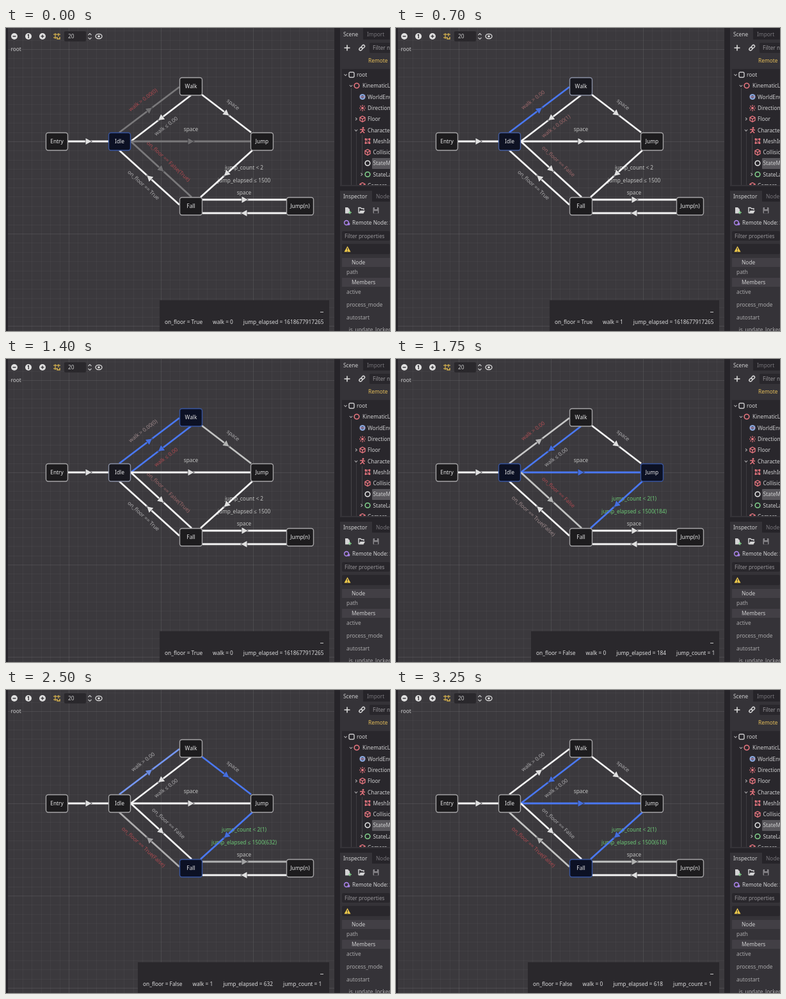
Write an HTML page with a canvas that moves like this. It is 600 px wide and 473 px high and loops after 3.3 s.

```html
<!DOCTYPE html>
<html lang="en">
<head>
<meta charset="utf-8">
<title>State machine editor</title>
<style>
html, body { margin: 0; width: 100%; height: 100%; overflow: hidden; background: #262429; }
canvas { display: block; }
</style>
</head>
<body>
<canvas id="c" width="600" height="473"></canvas>
<script>
const ctx = document.getElementById('c').getContext('2d');
const LOOP = 3300, STEP = 50, RATE = 3.9756;
const FONT = '8.35px "Noto Sans", "Open Sans", sans-serif';

const COLORS = {
  w: [244, 244, 244], g: [122, 121, 123], d: [94, 93, 96], m: [194, 195, 194],
  b: [74, 120, 242], l: [150, 180, 246],
  e: [172, 171, 173], r: [173, 73, 79], p: [158, 104, 106], k: [158, 138, 140], v: [108, 200, 118]
};
const LEVELS = { n: [0], h: [0.25], a: [1] };

// "g0 g600 w700": key letter plus time in ms, linear in between
function track(text, table = COLORS) {
  const keys = text.split(' ').map(s => ({ v: table[s[0]], t: +s.slice(1) }));
  return t => {
    let i = keys.length - 1;
    while (i > 0 && keys[i].t > t) i--;
    const a = keys[i], b = keys[i + 1];
    if (!b) return a.v;
    const f = Math.max(0, (t - a.t) / (b.t - a.t));
    return a.v.map((x, n) => x + (b.v[n] - x) * f);
  };
}
const rgb = c => `rgb(${c.map(Math.round)})`;

const states = 'I0 W650 I1350 J1700 F1750 I2250 W2300 J2350 F2400 I2900 W2950 I3000 J3100 F3150'
  .split(' ').map(s => [s[0], +s.slice(1)]);
const jumps = [[1700, 1703.72], [2350, 2341.15], [3100, 3094.55]];

function sample(t) {
  const state = states.filter(s => s[1] <= t).pop()[0];
  const jump = jumps.filter(j => j[0] <= t).pop();
  return {
    state,
    air: state === 'J' || state === 'F',
    jumped: !!jump,
    walk: +((t >= 650 && t < 1350) || (t >= 2250 && t < 3000)),
    elapsed: jump ? Math.max(0, Math.round((t - jump[1]) * RATE)) : 1618677917265
  };
}

const nodes = [
  ['Entry', 62, 163, 35, 'n0'],
  ['Idle', 160, 163, 35, 'a0 a680 n850 n1360 h1400 a1470 a1750 n1900 n2240 a2270 a2300 n2400 n2880 a2910 n2960 a3010 a3100 n3230'],
  ['Walk', 271, 77, 36, 'n0 n650 h700 a800 a1400 n1550 n2290 a2320 n2440 n2930 a2970 a3000 n3100'],
  ['Jump', 382, 163, 36, 'n0 n1690 a1710 a1750 n1900 n2330 a2360 n2500 n3090 a3120 a3150 n3240'],
  ['Fall', 271, 264, 36, 'n0 n1760 a1900 a2240 n2350 n2400 a2500 a2870 n3000 n3150 a3240'],
  ['Jump(n)', 438, 264, 43, 'n0']
].map(([name, x, y, w, keys]) => ({ name, x, y, w, level: track(keys, LEVELS) }));

const edges = [
  [97, 177, 160, 177, 'w0'],
  [177, 163, 271, 92, 'g0 g600 b650 b1430 g1600 g1690 m1740 w1850 w2290 b2300 b2400 w2800 w2940 b2950 b3010 w3200'],
  [289, 105, 195, 177, 'w0 w1340 b1350 b1800 w2150 w2990 b3000'],
  [306, 104, 383, 163, 'w0 w700 g850 g1340 m1400 w1500 w2340 b2350 b2500 w2800'],
  [195, 177, 382, 177, 'g0 g600 w700 w1420 g1550 g1690 b1700 b2000 l2200 w2350 w3090 b3100'],
  [195, 177, 290, 264, 'g0 g600 w700 w1400 g1550 g1690 m1750 w1850'],
  [385, 191, 304, 264, 'w0 w1740 b1750 b2050 l2200 w2350 w2390 b2400 b2550 w2800 w3140 b3150'],
  [271, 276, 177, 191, 'w0 w1760 g1900 g2240 b2250 b2350 w2430 g2550 g2800 m2850 b2900 b2950 w3100 w3180 m3250'],
  [307, 268, 438, 268, 'w0 w1760 g1900 g2220 w2300 w2420 d2600 d2860 w2950 w3190 m3250'],
  [438, 289, 307, 289, 'w0']
].map(([x1, y1, x2, y2, keys]) => ({ x1, y1, x2, y2, color: track(keys) }));

const labels = [
  [214, 112, -37, s => 'walk > 0.00' + (s.state === 'I' && !s.walk ? '(0)' : ''),
    'r0 r600 p700 e850 e1350 k1400 r1550 r1690 r1740 e1950'],
  [250, 153, -37, s => 'walk ≤ 0.00' + (s.state === 'W' ? '(1)' : ''),
    'e0 e650 p700 r800 r1400 e1600'],
  [254, 208, 42.5, s => 'on_floor == False' + (s.state === 'I' ? '(True)' : ''),
    'r0 r600 p700 e850 e1350 p1400 r1550 r1750 e1950'],
  [215, 245, 42.5, s => 'on_floor == True' + (s.air ? '(False)' : ''),
    'e0 e1700 k1750 r1900 r2240 e2300 e2350 r2480 r2890 e2950 e3100 r3250'],
  [355, 119, 38, () => 'space', 'e0'],
  [289, 158, 0, () => 'space', 'm0'],
  [372, 257, 0, () => 'space', 'm0'],
  [372, 218, 0, s => 'jump_count < 2' + (s.air ? '(1)' : ''),
    'm0 m1690 v1700 v2240 m2300 m2340 v2350 v2890 m2950 m3090 v3100'],
  [372, 238, 0, s => 'jump_elapsed ≤ 1500' + (s.air ? `(${s.elapsed})` : ''),
    'm0 m1690 v1700 v2060 r2150 r2240 m2300 m2340 v2350 v2700 r2800 r2890 m2950 m3090 v3100']
].map(([x, y, deg, text, keys]) => ({ x, y, deg, text, color: track(keys) }));

function box(x, y, w, h, fill, r = 0, stroke) {
  ctx.beginPath();
  ctx.roundRect(x, y, w, h, r);
  if (fill) { ctx.fillStyle = fill; ctx.fill(); }
  if (stroke) { ctx.strokeStyle = stroke; ctx.stroke(); }
}
function text(str, x, y, color = '#d0d0d1', align = 'left') {
  ctx.font = FONT;
  ctx.textAlign = align;
  ctx.fillStyle = color;
  ctx.fillText(str, x, y + 3);
}
function path(points, color, width = 1, close = false, fill = false) {
  ctx.beginPath();
  for (let i = 0; i < points.length; i += 2) ctx.lineTo(points[i], points[i + 1]);
  if (close) ctx.closePath();
  ctx.lineWidth = width;
  ctx.strokeStyle = ctx.fillStyle = color;
  if (fill) ctx.fill(); else ctx.stroke();
}
function disc(x, y, r, color, width = 0) {
  ctx.beginPath();
  ctx.arc(x, y, r, 0, 7);
  ctx.lineWidth = width;
  ctx.strokeStyle = ctx.fillStyle = color;
  if (width) ctx.stroke(); else ctx.fill();
}

function drawGrid() {
  box(3, 0, 510, 473, '#3b393d');
  const line = (i, x, y, w, h) => {
    ctx.fillStyle = i % 10 ? 'rgba(255,255,255,.035)' : 'rgba(255,255,255,.085)';
    ctx.fillRect(x, y, w, h);
  };
  for (let i = -6; i < 29; i++) line(i, Math.round(98 + i * 14.4), 0, 1, 473);
  for (let i = -2; i < 31; i++) line(i, 3, Math.round(33 + i * 14.4), 510, 1);
}

function drawToolbar() {
  const light = '#e0e0e0', dark = '#39373b';
  for (const x of [13, 35, 57]) disc(x, 13, 5, light);
  path([10.5, 13, 15.5, 13], dark, 1.5);
  path([33.7, 11.2, 35.3, 10.4, 35.3, 16], dark, 1.4);
  path([54.5, 13, 59.5, 13], dark, 1.4);
  path([57, 10.5, 57, 15.5], dark, 1.4);
  const gold = '#d9b44f';
  path([77, 8, 77, 17], gold, 1.2);
  path([82, 8, 82, 13], gold, 1.2);
  path([74, 10, 85, 10], gold, 1.2);
  path([74, 15, 79, 15], gold, 1.2);
  path([80, 14, 80, 17, 84, 17, 84, 14], gold, 1.5);
  box(91, 5, 34, 16, '#2a282c', 2);
  text('20', 97, 13);
  path([128.5, 11, 131, 8.5, 133.5, 11], '#c5c5c6', 1.2);
  path([128.5, 15, 131, 17.5, 133.5, 15], '#c5c5c6', 1.2);
  ctx.beginPath();
  ctx.ellipse(145, 13, 5, 3.7, 0, 0, 7);
  ctx.lineWidth = 1.3;
  ctx.strokeStyle = light;
  ctx.stroke();
  disc(145, 13, 1.8, light);
  text('root', 7.5, 33, '#c4c4c5');
}

function drawEdge(e, t) {
  const c = e.color(t), angle = Math.atan2(e.y2 - e.y1, e.x2 - e.x1);
  path([e.x1, e.y1, e.x2, e.y2], rgb(c), 2.8);
  ctx.save();
  ctx.translate((e.x1 + e.x2) / 2, (e.y1 + e.y2) / 2);
  ctx.rotate(angle);
  const tri = [-4, -5, 5, 0, -4, 5];
  path(tri, 'rgba(50,48,53,.75)', 1.6, true);
  path(tri, rgb(c.map(x => x * 0.92)), 1, true, true);
  ctx.restore();
}

function drawNode(n, t) {
  const k = n.level(t)[0], mix = (a, b) => rgb(a.map((x, i) => x + (b[i] - x) * k));
  ctx.lineWidth = 1.4;
  box(n.x + 0.5, n.y + 0.5, n.w - 1, 27.5, mix([29, 28, 30], [12, 17, 36]), 3.5,
    mix([164, 163, 165], [55, 84, 158]));
  text(n.name, n.x + n.w / 2, n.y + 14, '#e6e6e7', 'center');
}

function drawStatus(t, s) {
  const left = !s.jumped ? 240 : t < 2000 && s.elapsed < 1000 ? 211 : 206;
  box(left, 425, 505 - left, 48, '#2a282c');
  path([491, 443.5, 496, 443.5], '#c8c8c9', 1);
  const items = [
    'on_floor = ' + (s.air ? 'False' : 'True'),
    'walk = ' + s.walk,
    'jump_elapsed = ' + s.elapsed
  ];
  if (s.jumped) items.push('jump_count = 1');
  let x = left + 8;
  for (const item of items) {
    text(item, x, 459, '#dcdcdd');
    x += ctx.measureText(item).width + 16;
  }
}

const PINK = '#ea7780', GREY = '#c9c9ca';
const icons = {
  root: (x, y) => { ctx.lineWidth = 1.4; box(x - 4, y - 4, 8, 8, null, 2, GREY); },
  ring: (x, y, c) => disc(x, y, 3.8, c, 1.6),
  globe: (x, y) => { disc(x, y, 4.6, '#8aa6dc'); disc(x, y, 1.7, '#29272c', 1); path([x - 4, y, x + 4, y], '#c98aa8', 1); },
  sun: (x, y) => {
    disc(x, y, 2, PINK);
    for (let i = 0; i < 8; i++) {
      const a = i * Math.PI / 4, cx = Math.cos(a), cy = Math.sin(a);
      path([x + cx * 3, y + cy * 3, x + cx * 5, y + cy * 5], PINK, 1.2);
    }
  },
  cube: (x, y) => {
    path([x, y - 4.5, x + 4, y - 2.3, x + 4, y + 2.3, x, y + 4.5, x - 4, y + 2.3, x - 4, y - 2.3], PINK, 1.3, true);
    path([x - 4, y - 2.3, x, y, x + 4, y - 2.3], PINK, 1.2);
    path([x, y, x, y + 4.5], PINK, 1.2);
  },
  runner: (x, y) => {
    disc(x + 1, y - 3.5, 1.5, PINK);
    path([x - 4, y - 1, x, y - 1, x + 4, y], PINK, 1.5);
    path([x, y - 1, x, y + 1.5, x - 3.5, y + 4.5], PINK, 1.6);
    path([x, y + 1, x + 3, y + 4.5], PINK, 1.6);
  },
  mesh: (x, y) => {
    path([x - 3, y - 3, x + 3, y - 3, x + 3, y + 3, x - 3, y + 3, x - 3, y - 3, x + 3, y + 3], PINK, 1);
    for (const [a, b] of [[-3, -3], [3, -3], [3, 3], [-3, 3]]) disc(x + a, y + b, 1.5, PINK);
  }
};
const tree = [
  ['root', 540, 73, 548, 'root'],
  ['KinematicLevel', 548, 90, 557, 'ring', PINK],
  ['WorldEnvironment', 557, 107.5, 565, 'globe'],
  ['DirectionalLight', 557, 125, 565, 'sun'],
  ['Floor', 557, 142, 565, 'cube'],
  ['CharacterBody', 557, 159.5, 565, 'runner'],
  ['MeshInstance', 565, 176.5, 573.5, 'mesh'],
  ['CollisionShape', 565, 194, 573.5, 'cube'],
  ['StateMachine', 565, 211, 573.5, 'ring', '#e6e6e6'],
  ['StateLabel', 565, 228.5, 573.5, 'ring', '#82d18c'],
  ['Camera', 557, 246, 565, 'cube']
];

function arrow(x, y, open) {
  path(open ? [x - 2.2, y - 1, x, y + 1.4, x + 2.2, y - 1] : [x - 1, y - 2.2, x + 1.4, y, x - 1, y + 2.2], '#aaa9ab', 1.1);
}

function drawScene() {
  box(522, 18, 78, 229, '#353338');
  box(522, 0, 36, 19, '#353338');
  text('Scene', 527, 9.5);
  text('Import', 564, 9.5, '#77757a');
  path([528.5, 31, 537.5, 31], '#dadada', 1.6);
  path([533, 26.5, 533, 35.5], '#dadada', 1.6);
  ctx.save();
  ctx.translate(556, 31);
  ctx.rotate(-Math.PI / 4);
  ctx.lineWidth = 1.5;
  box(-5, -2, 5.5, 4, null, 2, '#d2d2d3');
  box(0, -2, 5.5, 4, null, 2, '#d2d2d3');
  ctx.restore();
  box(568, 23, 40, 16, '#29272c', 2);
  text('Filter nodes', 573, 31, '#98969a');
  text('Remote', 566, 51, '#e3bc58');

  ctx.save();
  ctx.beginPath();
  ctx.rect(525, 64, 75, 181);
  ctx.clip();
  box(525, 64, 75, 181, '#29272c');
  box(572, 203, 40, 17, '#59575c', 1);
  path([539.5, 94, 539.5, 245], '#474549', 1);
  path([547.5, 163, 547.5, 245], '#3d3b40', 1);
  path([556.5, 167, 556.5, 229], '#474549', 1);
  arrow(530.5, 73, true);
  arrow(539, 90, true);
  arrow(547, 142, false);
  arrow(547, 159.5, true);
  arrow(555.5, 228.5, false);
  for (const [name, ix, y, tx, icon, color] of tree) {
    icons[icon](ix, y, color);
    text(name, tx, y);
  }
  ctx.restore();
}

function drawInspector() {
  box(522, 271, 78, 202, '#353338');
  box(522, 254, 50, 18, '#353338');
  text('Inspector', 527, 262.5);
  text('Node', 578, 262.5, '#77757a');
  path([530, 280, 534, 280, 537, 283, 537, 289.5, 530, 289.5], '#d4d4d5', 1, true, true);
  path([535, 288, 540, 288], '#82d18c', 1.3);
  path([537.5, 285.5, 537.5, 290.5], '#82d18c', 1.3);
  path([551, 289, 551, 280.5, 554, 280.5, 555.5, 282, 559, 282, 559, 284], '#d4d4d5', 1.4);
  path([551, 289.5, 553.5, 285, 561, 285, 558.5, 289.5], '#d4d4d5', 1, true, true);
  box(573.5, 280, 9, 9.5, '#88868a', 1);
  box(576, 280, 4, 3, '#353338');
  box(575, 285.5, 6, 4, '#353338');
  disc(532, 304, 3.4, '#a681e6', 1.6);
  disc(535.5, 306, 2, '#a681e6');
  text('Remote Node: StateMachine', 541, 304);
  box(525, 317, 75, 15, '#29272c', 2);
  text('Filter properties', 529, 324.5, '#98969a');
  box(525, 337, 75, 16, '#29272c', 2);
  path([533.5, 340.5, 538.5, 349.5, 528.5, 349.5], '#efca4b', 1, true, true);
  path([533.5, 343.5, 533.5, 346.5], '#353338', 1.2);
  disc(533.5, 348.2, 0.7, '#353338');
  for (const [name, y] of [['Node', 366], ['Members', 397]]) {
    box(525, y - 7, 75, 14, '#423f45');
    text(name, 540, y);
  }
  const rows = [['path', 381], ['active', 412], ['process_mode', 432], ['autostart', 451.5], ['_is_update_locked', 470.5]];
  for (const [name, y] of rows) text(name, 532, y, '#a9a8aa');
}

function draw(t) {
  const s = sample(t);
  box(0, 0, 600, 473, '#262429');
  drawGrid();
  for (const l of labels) {
    ctx.save();
    ctx.translate(l.x, l.y);
    ctx.rotate(l.deg * Math.PI / 180);
    text(l.text(s), 0, 0, rgb(l.color(t)), 'center');
    ctx.restore();
  }
  edges.forEach(e => drawEdge(e, t));
  nodes.forEach(n => drawNode(n, t));
  drawToolbar();
  drawStatus(t, s);
  drawScene();
  drawInspector();
}

const start = performance.now();
function tick() {
  const t = (performance.now() - start) % LOOP;
  draw(Math.floor(t / STEP) * STEP);
  requestAnimationFrame(tick);
}
tick();
</script>
</body>
</html>
```
